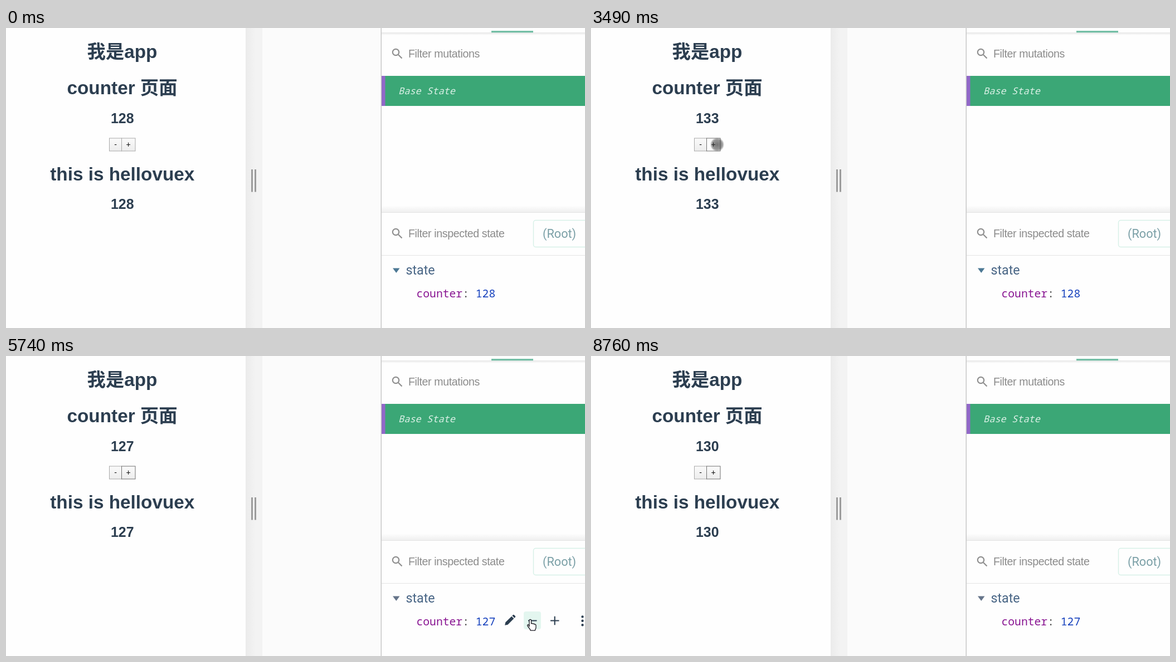
An HTML page that plays this animation: 1039x539 px, repeating every 9.92 s.

```html
<!DOCTYPE html>
<html lang="zh">
<head>
<meta charset="utf-8">
<style>
html, body { margin: 0; width: 100%; height: 100%; overflow: hidden; background: #fefefe; }
svg { display: block; }
.page { font: bold 33.3px "Liberation Sans", Arial, "Noto Sans CJK SC", sans-serif; fill: #2c3e50; text-anchor: middle; }
.page .num { font-size: 24.9px; }
.page .key { font-size: 14px; font-weight: normal; fill: #111; }
.hint { font: 19.6px "Liberation Sans", Arial, sans-serif; letter-spacing: -.38px; fill: #8b8b8b; }
.mono { font-family: "Noto Sans Mono", monospace; white-space: pre; }
.label { font-family: Roboto, sans-serif; }
</style>
</head>
<body>
<svg width="1039" height="539" viewBox="0 0 1039 539">
  <defs>
    <linearGradient id="face" x2="0" y2="1"><stop stop-color="#fafafa"/><stop offset="1" stop-color="#ededed"/></linearGradient>
    <linearGradient id="edge"><stop stop-color="#ebebeb"/><stop offset=".6" stop-color="#f3f3f3"/></linearGradient>
    <linearGradient id="fall" x2="0" y2="1"><stop stop-color="#e6e6e6"/><stop offset="1" stop-color="#fefefe"/></linearGradient>
    <linearGradient id="rise" x2="0" y2="1"><stop stop-color="#fefefe"/><stop offset="1" stop-color="#efefef"/></linearGradient>
    <radialGradient id="idle"><stop stop-color="#222" stop-opacity=".62"/><stop offset=".75" stop-color="#333" stop-opacity=".5"/><stop offset="1" stop-color="#444" stop-opacity=".1"/></radialGradient>
    <radialGradient id="press"><stop stop-color="#bfb61c" stop-opacity=".88"/><stop offset=".8" stop-color="#cfc824" stop-opacity=".85"/><stop offset="1" stop-color="#ded94a" stop-opacity=".6"/></radialGradient>
    <g id="search" fill="none" stroke="#8f8f8f" stroke-width="2.2"><circle cx="699.5" cy="43.5" r="5.7"/><path d="M704 48l6.5 6.5"/></g>
  </defs>

  <g class="page">
    <text x="208.5" y="53.5">我是app</text>
    <text x="208.5" y="119">counter 页面</text>
    <text x="208.8" y="171" class="num"></text>
    <rect x="185.5" y="198" width="22" height="23" fill="url(#face)" stroke="#a9a9a9"/>
    <rect id="plus" x="207.5" y="198" width="24.5" height="23"/>
    <text x="196.5" y="213.5" class="key">-</text>
    <text x="219.7" y="213.5" class="key">+</text>
    <text x="208.8" y="274">this is hellovuex</text>
    <text x="208.8" y="325" class="num"></text>
  </g>

  <path fill="url(#edge)" d="M430 0h30v539h-30z"/>
  <path fill="#fbfbfb" d="M460 0h213v539h-213z"/>
  <path stroke="#9c9c9c" stroke-width="3" d="M441.5 254v40.5M447.5 254v40.5"/>

  <path fill="url(#fall)" d="M674 8h365v5h-365z"/>
  <path fill="#74bfa6" d="M871 5h75v3.2h-75z"/>
  <use href="#search"/>
  <text class="hint" x="722" y="52.5">Filter mutations</text>
  <path fill="#3ba776" d="M674 86h365v54h-365z"/>
  <path fill="#9168c8" d="M674 86h6.5v54h-6.5z"/>
  <text class="mono" x="704" y="119" font-size="17" font-style="italic" font-weight="500" fill="#dcf1e7">Base State</text>

  <path fill="url(#rise)" d="M674 319h365v12h-365z"/>
  <path stroke="#e4e4e4" d="M674 331.5h365M674 408.5h365"/>
  <use href="#search" y="323"/>
  <text class="hint" x="722" y="375.5">Filter inspected state</text>
  <rect x="946.5" y="345.5" width="120" height="48" rx="4" fill="#fefefe" stroke="#d6f0e7" stroke-width="1.4"/>
  <text class="label" x="963" y="377" font-size="21.7" fill="#7a9fa6">(Root)</text>
  <path id="fold" d="M694 431.5h12.5l-6.2 8.5z"/>
  <text class="label" x="717.5" y="443" font-size="23.2" fill="#486585">state</text>
  <text class="mono" x="736.5" y="483.5" font-size="19.7" fill="#444"><tspan fill="#881391">counter</tspan>: <tspan id="value" fill="#1540bd"></tspan></text>
  <path stroke="#c6c6c6" stroke-width="1.5" d="M673.3 0v539"/>

  <g id="tools" fill="#2c3e50">
    <rect id="halo" x="929" y="459" width="31" height="32" rx="4" fill="#e3f6ef"/>
    <path transform="translate(904 475) rotate(45)" d="M-2.9-7.5h5.8v15.5l-2.9 4.5-2.9-4.5zM-2.9-9v-2q0-1.5 1.5-1.5h2.8q1.5 0 1.5 1.5v2z"/>
    <path stroke="#2c3e50" stroke-width="2.1" d="M937 475.5h15.5M977 475.5h15.5M984.7 467.8v15.5"/>
    <path stroke="#2c3e50" stroke-width="4.4" stroke-linecap="round" stroke-dasharray="0 7.4" d="M1034.5 468.4v15"/>
  </g>

  <circle id="touch" r="12.3"/>
  <g fill="#fff" stroke="#1c1c24" stroke-width="1.3" stroke-linejoin="round">
    <path id="arrow" d="M0 0V16l3.7-3.5 2.5 5.8 2.4-1-2.5-5.7h5z"/>
    <path id="hand" d="M5 13V2.2a1.8 1.8 0 0 1 3.6 0V8c.6-1 3-.8 3.2.6.8-.8 2.6-.5 2.9.8.9-.6 2.3 0 2.3 1.6v4c0 2-1.6 3.2-1.6 5.2H7.2C7 17 2.5 14 1.6 11.2c-.3-1.6 1.6-2 2.4-.6z"/>
  </g>
</svg>
<script>
const LOOP = 9920, STEP = 77, HOLD = 150, MINUS_CLICK = 5660;
const $ = id => document.getElementById(id);
const nums = document.querySelectorAll('.num');

// Each move runs through its key points, then the pointer rests on the last one.
const moves = [
  { from: 210, to: 450, via: [[845, 520], [405, 207]] },
  { from: 840, to: 1450, via: [[412, 210], [323, 190], [267, 170], [226.5, 209.5]] },
  { from: 3720, to: 4110, via: [[420, 235], [965, 375], [845, 443]] },
  { from: 4410, to: 5330, via: [[821, 461], [942, 473.5]] },
  { from: 6370, to: 6600, via: [[800, 425], [364, 303]] },
  { from: 6980, to: 7520, via: [[229, 261], [143, 192], [165, 209], [228.5, 210]] },
  { from: 8610, to: 8760, via: [[400, 400], [620, 630]] }
];
const releases = [1770, 2240, 2710, 3110, 3340, 7750, 8210, 8440];

const mix = (a, b, p) => a + (b - a) * p;

function pointer(t) {
  const move = moves.findLast(m => m.from <= t);
  if (!move) return [-100, 600];
  const { from, to, via } = move;
  const stepped = Math.floor((t - from + 4) / STEP) * STEP;
  const s = Math.min(1, stepped / (to - from - 8)) * (via.length - 1);
  const i = Math.min(Math.floor(s), via.length - 2);
  return [0, 1].map(axis => mix(via[i][axis], via[i + 1][axis], s - i));
}

function show(el, on) { el.style.display = on ? '' : 'none'; }
function place(el, x, y) { el.setAttribute('transform', `translate(${x} ${y})`); }

function draw(t) {
  const [x, y] = pointer(t);
  const clicked = t >= MINUS_CLICK;
  const added = releases.filter(r => r <= t && (r > MINUS_CLICK || !clicked)).length;
  const base = clicked ? 127 : 128;
  nums.forEach(n => n.textContent = base + added);
  $('value').textContent = base;

  const focused = t >= 1920;
  const over = x > 207 && x < 232 && y > 198 && y < 222;
  $('plus').setAttribute('fill', focused && over ? '#fcfcfc' : 'url(#face)');
  $('plus').setAttribute('stroke', focused ? '#737373' : '#a9a9a9');

  const inTools = x > 674, onRow = inTools && y > 455 && y < 498;
  show($('tools'), onRow);
  show($('halo'), onRow && x > 929 && x < 960);
  $('fold').setAttribute('fill', t >= 4410 ? '#66758a' : '#4c7894');

  const onPage = x < 430;
  const onLink = onRow || inTools && y > 415 && y < 455 || x > 946 && y > 345 && y < 394;
  const pressed = releases.some(r => t >= r - HOLD && t < r);
  show($('touch'), onPage);
  show($('hand'), !onPage && onLink);
  show($('arrow'), !onPage && !onLink);
  $('touch').setAttribute('fill', pressed ? 'url(#press)' : 'url(#idle)');
  place($('touch'), x, y);
  place($('arrow'), x, y);
  place($('hand'), x - 8, y - .5);
}

const start = performance.now();
function tick() {
  draw((performance.now() - start) % LOOP);
  requestAnimationFrame(tick);
}
tick();
</script>
</body>
</html>
```
